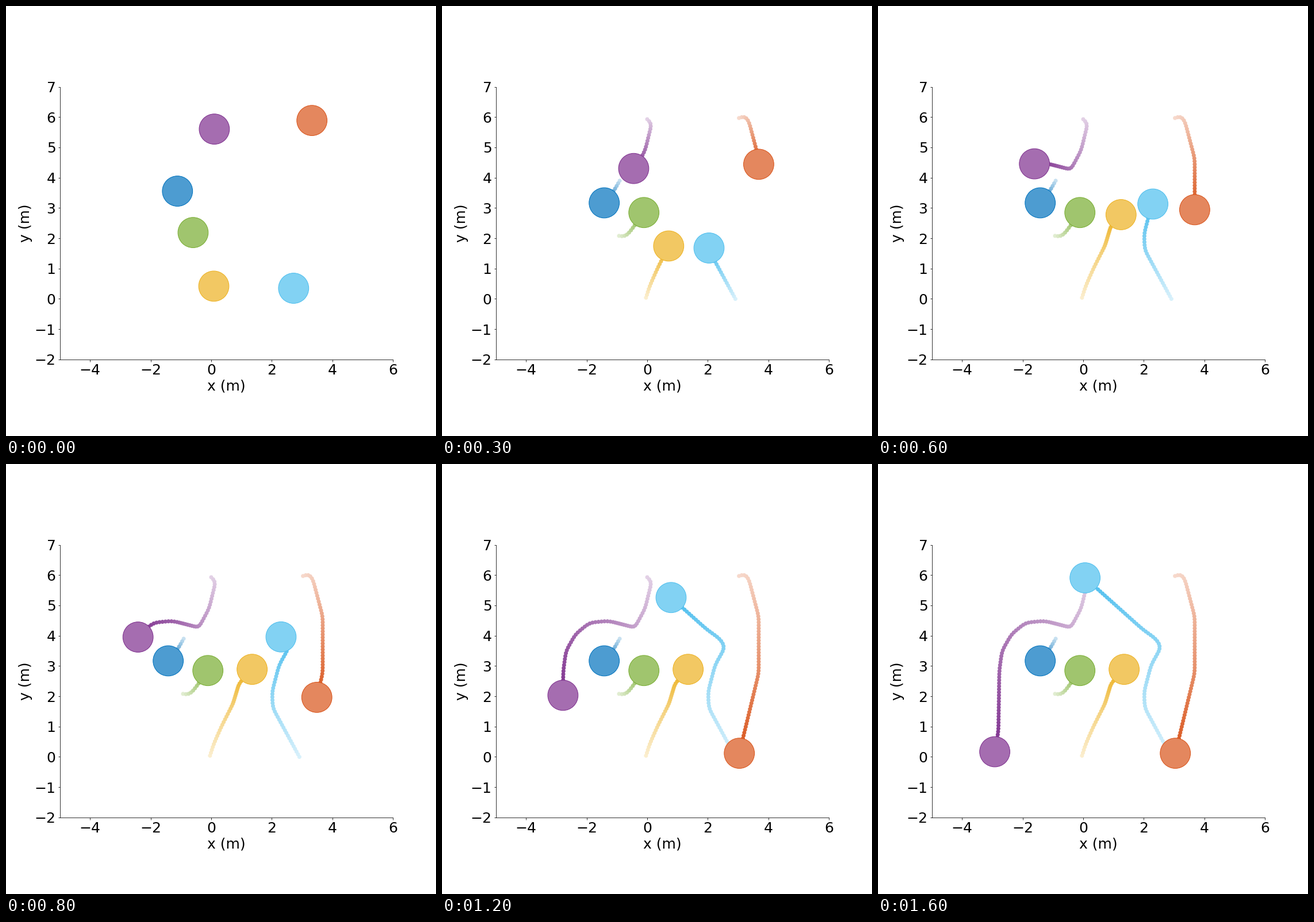
Animation of 748x748 px, one loop 2600 ms. Source, as a matplotlib script:

```python
import numpy as np
import matplotlib.pyplot as plt
from matplotlib.animation import FuncAnimation
from matplotlib.colors import to_rgb

SIZE, DPI = 748, 72
FRAMES, INTERVAL = 26, 100
LAST_MOVING = 16             # the final pose is held from here on
STEPS, FIRST = 5, 4          # simulation steps per frame, step shown first
RADIUS = 0.5
SPEED, SLOW_SPEED = 0.1, 0.07    # metres per step
CROWDED = range(18, 29)          # steps in which yielding robots slow down

# Colour, whether the robot yields in the crowd, corners of its route.
ROBOTS = [
    ("#0072BD", False, [(-.91, 3.90), (-1.11, 3.55), (-1.42, 3.17)]),
    ("#D95319", False, [(3.03, 5.97), (3.22, 6.05), (3.35, 5.88),
                        (3.68, 4.63), (3.68, 2.77), (3.04, .12)]),
    ("#EDB120", True, [(-.04, .04), (.08, .42), (.34, 1.01),
                       (.72, 1.76), (.92, 2.43), (1.35, 2.89)]),
    ("#7E2F8E", True, [(0, 5.93), (.15, 5.80), (-.07, 4.90), (-.41, 4.27),
                       (-1.28, 4.49), (-1.90, 4.43), (-2.36, 4.06),
                       (-2.68, 3.50), (-2.77, 2.85), (-2.80, .85), (-2.92, .17)]),
    ("#77AC30", False, [(-.93, 2.08), (-.74, 2.04), (-.58, 2.20), (-.11, 2.85)]),
    ("#4DBEEE", False, [(2.91, 0), (2.03, 1.62), (2.01, 2.15), (2.24, 3.03),
                        (2.57, 3.62), (2.42, 3.88), (1.95, 4.22), (.06, 5.91)]),
]


def tint(color, strength):
    """Mix a colour with white; strength may be an array."""
    strength = np.reshape(strength, (-1, 1))
    return 1 - strength * (1 - np.array(to_rgb(color)))


def smooth(values):
    """Round the corners while keeping straight parts and both ends."""
    padded = np.pad(values, 2, mode="reflect", reflect_type="odd")
    return np.convolve(padded, np.array([1, 2, 3, 2, 1]) / 9, mode="valid")


def walk(corners, yields):
    """Position at each step from the start until the robot arrives."""
    corners = np.array(corners)
    lengths = np.hypot(*np.diff(corners, axis=0).T)
    marks = np.append(0, np.cumsum(lengths))
    travelled = [0]
    while travelled[-1] < marks[-1]:
        slow = yields and len(travelled) - 1 in CROWDED
        travelled.append(travelled[-1] + (SLOW_SPEED if slow else SPEED))
    return np.column_stack([smooth(np.interp(travelled, marks, axis))
                            for axis in corners.T])


class Robot:
    def __init__(self, ax, color, yields, corners):
        self.color = color
        self.path = walk(corners, yields)
        self.trail = ax.scatter([], [], s=36, zorder=3)
        self.body = plt.Circle(self.path[0], RADIUS, fc=tint(color, 0.7)[0],
                               ec=color, lw=1, zorder=4)
        ax.add_patch(self.body)

    def move_to(self, step):
        walked = self.path[:step + 1]
        self.trail.set_offsets(walked)
        self.trail.set_facecolor(tint(self.color, np.linspace(0.22, 1, len(walked))))
        self.body.center = walked[-1]


plt.rcParams.update({"font.family": "DejaVu Sans", "font.size": 25})
fig, ax = plt.subplots(figsize=(SIZE / DPI, SIZE / DPI), dpi=DPI)
ax.set_aspect("equal")
ax.set(xlim=(-5, 6), ylim=(-2, 7), xlabel="x (m)", ylabel="y (m)",
       xticks=range(-4, 7, 2), yticks=range(-2, 8))
ax.spines[["top", "right"]].set_visible(False)
robots = [Robot(ax, *spec) for spec in ROBOTS]


def update(frame):
    step = FIRST + STEPS * min(frame, LAST_MOVING)
    for robot in robots:
        robot.move_to(step)


anim = FuncAnimation(fig, update, frames=FRAMES, interval=INTERVAL,
                     repeat=True, repeat_delay=0)
plt.show()
```
